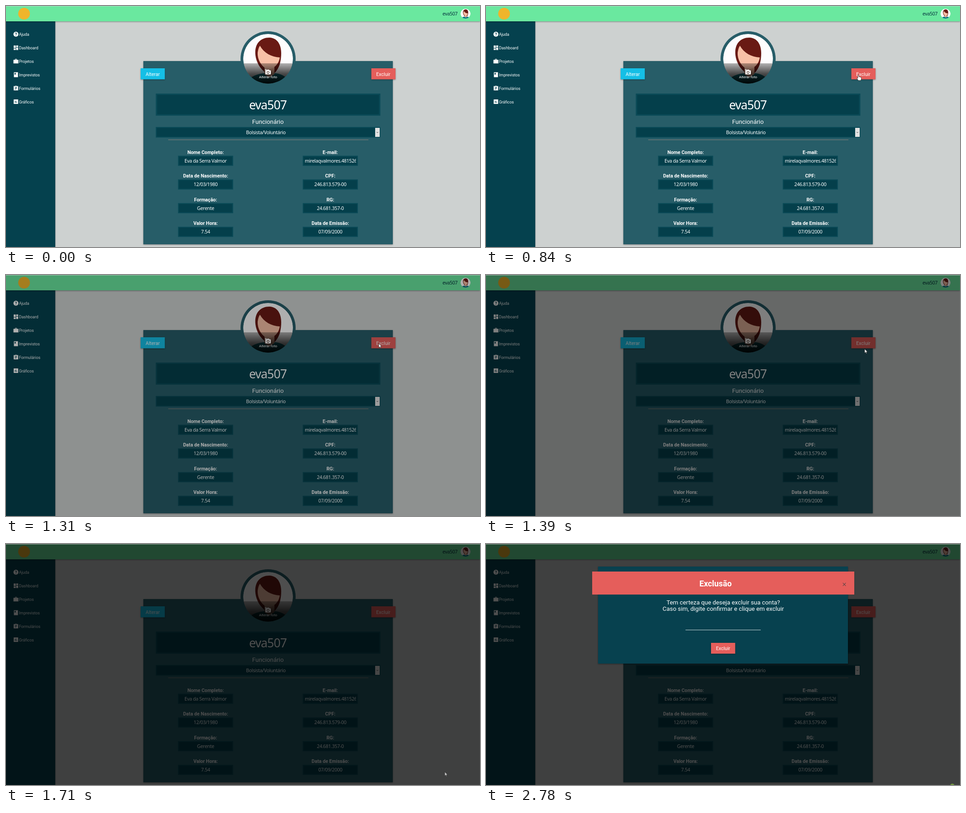
Recreate the animation shown at these times as an HTML page. Size 1049 by 534 pixels, loop 2860 ms.

```html
<!DOCTYPE html>
<html lang="pt-BR">
<head>
<meta charset="utf-8">
<title>Exclusão de conta</title>
<style>
html, body { margin: 0; width: 100%; height: 100%; overflow: hidden; background: #cdd1d0; }
svg.stage { display: block; width: 100vw; height: 100vh; }
text { font: 10.67px Roboto, sans-serif; fill: #fff; }
.mid { text-anchor: middle; }
.bold { font-weight: 700; }
.input { font-family: "Noto Sans", sans-serif; letter-spacing: -.035em; }
.user { font-size: 26.67px; }
.role { font-size: 13.33px; }
.menu { font-size: 8.89px; }
.small { font-size: 8px; }
.title { font-size: 17.8px; font-weight: 700; }
.white { fill: #fff; fill-rule: evenodd; }
.lift { filter: drop-shadow(0 1px 1.5px rgba(0, 0, 0, .4)); }

#dim, #cursor, #arrow, #hand, #modal, #spot { animation: 2860ms step-end infinite; }

#dim { animation-name: dim; }
@keyframes dim {
  0% { opacity: 0; }
  43% { opacity: .12; }
  45.8% { opacity: .31; }
  48.6% { opacity: .5; }
  51.74%, 100% { opacity: .69; }
}
#cursor { animation-name: travel; }
@keyframes travel {
  0% { transform: translate(1100px, 600px); }
  5.24% { transform: translate(1016px, 516px); }
  8.04% { transform: translate(988px, 462px); }
  10.83% { transform: translate(948px, 388px); }
  13.28% { transform: translate(910px, 312px); }
  16.08% { transform: translate(874px, 246px); }
  18.88% { transform: translate(849px, 200px); }
  21.32% { transform: translate(835px, 172px); }
  24.12% { transform: translate(827px, 157px); }
  26.92% { transform: translate(824px, 152px); }
  40.55% { transform: translate(825px, 152px); }
  48.6% { transform: translate(838px, 164px); }
  51.74% { transform: translate(870px, 194px); }
  53.84% { transform: translate(903px, 262px); }
  56.99% { transform: translate(944px, 385px); }
  59.79% { transform: translate(971px, 505px); }
  62.23%, 100% { transform: translate(1100px, 600px); }
}
#arrow { animation-name: arrow; }
@keyframes arrow {
  0% { opacity: 1; }
  24.12% { opacity: 0; }
  40.55% { opacity: 1; }
  51.74%, 100% { opacity: .7; }
}
#hand { animation-name: hand; }
@keyframes hand {
  0% { opacity: 0; }
  24.12% { opacity: 1; }
  40.55%, 100% { opacity: 0; }
}
#modal { animation-name: modal; transform-origin: 524.5px 157.5px; }
@keyframes modal {
  0% { opacity: 0; }
  62.23% { opacity: .4; transform: translateY(-18px) scale(.88); }
  65.03% { opacity: .85; transform: translateY(-4px) scale(.97); }
  67.83%, 100% { opacity: 1; transform: none; }
}
#spot { animation-name: spot; }
@keyframes spot {
  0% { opacity: 0; }
  97.2%, 100% { opacity: 1; }
}
</style>
</head>
<body>
<svg class="stage" viewBox="0 0 1049 534" preserveAspectRatio="none">
  <defs>
    <linearGradient id="shade" x2="0" y2="1">
      <stop stop-opacity=".3"/>
      <stop offset=".5" stop-opacity=".7"/>
      <stop offset="1" stop-opacity=".95"/>
    </linearGradient>
    <clipPath id="round"><circle r="55"/></clipPath>
    <g id="avatar" clip-path="url(#round)">
      <circle r="55" fill="#fdfdfd"/>
      <path d="M-46 55Q-42 36-10 32H16Q40 34 48 55Z" fill="#117a86"/>
      <path d="M-28-8C-31-34-16-47 3-47C21-46 30-31 29-8C28 8 25 20 15 31L-3 33C-18 22-26 8-28-8Z" fill="#691a14"/>
      <path d="M-8 18H14V34L3 42L-8 34Z" fill="#e9ac91"/>
      <path d="M-18-29C-9-13 7-4 26-3C24 11 14 21 2 24C-14 20-24 2-23-14C-22-20-21-25-18-29Z" fill="#f8c1a7"/>
    </g>
  </defs>

  <rect width="1049" height="534" fill="#cdd1d0"/>
  <rect class="lift" y="33" width="109" height="501" fill="#05414e"/>
  <rect class="lift" x="304" y="122" width="552" height="406" fill="#275d68"/>
  <circle cx="580" cy="117" r="61" fill="#275d68"/>

  <rect class="lift" width="1049" height="34" fill="#6ae89f"/>
  <circle cx="40" cy="17" r="13" fill="#efb52b"/>
  <text class="input" x="966" y="21.3" style="fill:#04313d">eva507</text>
  <use href="#avatar" transform="translate(1017 17) scale(.2)"/>
  <g id="menu"></g>

  <use href="#avatar" transform="translate(580 117)"/>
  <g transform="translate(580 117)" clip-path="url(#round)">
    <rect x="-55" y="10" width="110" height="45" fill="url(#shade)"/>
  </g>
  <path class="white" d="M575 142.5h2l1-1.5h4l1 1.5h2q1 0 1 1v7q0 1-1 1h-10q-1 0-1-1v-7q0-1 1-1ZM580 144a3 3 0 1 0 .01 0ZM580 145.2a1.8 1.8 0 1 1-.01 0Z"/>
  <path d="M573 141.5h4M575 139.5v4" stroke="#fff"/>
  <text class="mid small" x="580" y="159.7">Alterar foto</text>

  <rect class="lift" x="298" y="138" width="53.5" height="24.5" fill="#15bfe6"/>
  <text class="mid" x="324.7" y="154.8">Alterar</text>
  <rect class="lift" x="808.5" y="138" width="53.5" height="24.5" fill="#e55e5b"/>
  <text class="mid" x="835" y="154.8">Excluir</text>

  <g id="boxes"></g>
  <text class="mid input user" x="579.5" y="229">eva507</text>
  <text class="mid role" x="579.7" y="260.7">Funcionário</text>
  <text class="mid input" x="575" y="284">Bolsista/Voluntário</text>
  <rect x="817" y="270" width="10" height="20" fill="#e2e2e2"/>
  <path d="M820 279l2 2 2-2" fill="none" stroke="#444" stroke-width=".9"/>
  <path d="M359 296.5H802" stroke="#87807b"/>
  <g id="fields"></g>

  <rect id="dim" width="1049" height="534"/>
  <path d="M0 .5H1049" stroke="#d3dad7" stroke-opacity=".6"/>

  <g id="modal">
    <rect class="lift" x="248" y="50" width="553" height="215" fill="#07414f"/>
    <rect x="235" y="61" width="580" height="51" fill="#e55e5b"/>
    <text class="mid title" x="508" y="94">Exclusão</text>
    <path d="M789.7 86.2l6.6 6.6m0-6.6l-6.6 6.6" stroke="#5b4548" stroke-width="1.1"/>
    <text class="mid role" x="525" y="134.2">Tem certeza que deseja excluir sua conta?</text>
    <text class="mid role" x="525" y="147.5">Caso sim, digite confirmar e clique em excluir</text>
    <path d="M441.5 190.5H608" stroke="#e9efef" stroke-opacity=".85"/>
    <rect class="lift" x="498" y="219" width="53.5" height="24" fill="#e55e5b"/>
    <text class="mid" x="524.7" y="235.3">Excluir</text>
  </g>

  <g id="cursor" stroke="#222" stroke-width=".7" fill="#fff">
    <path id="arrow" d="M0 0V8.800L2.100 7L3.400 10L4.800 9.400L3.500 6.400H6.400Z"/>
    <path id="hand" d="M-1 1Q0-.5 1 1V5Q2.4 4 3 5.4Q4.5 4.6 5 6Q6.6 5.4 6.6 7V9Q6.6 11 5.4 13H0Q-1.6 10.5-3.6 8Q-3.4 6.3-1 8.2Z"/>
  </g>
  <circle id="spot" cx="1032" cy="536" r="5" fill="#71963f"/>
</svg>

<script>
const fill = (id, parts) => document.getElementById(id).innerHTML = parts.join('');

const box = (x, y, w, h, edge) =>
  `<rect x="${x}" y="${y}" width="${w}" height="${h}" fill="#0a4a57"/>
   <rect x="${x + edge}" y="${y + edge}" width="${w - 2 * edge}" height="${h - 2 * edge}" fill="#043f4b"/>`;

const columns = [
  [441.7, ['Nome Completo:', 'Eva da Serra Valmor'], ['Data de Nascimento:', '12/03/1980'],
    ['Formação:', 'Gerente'], ['Valor Hora:', '7.54']],
  [717.7, ['E-mail:', 'mirelaqvalmores.481526@'], ['CPF:', '246.813.579-00'],
    ['RG:', '24.681.357-0'], ['Data de Emissão:', '07/09/2000']]
];
const boxes = [box(331.5, 194, 497, 49, 3), box(331.5, 268, 497, 23.5, 2)];
const fields = [];
for (const [x, ...rows] of columns) {
  rows.forEach(([label, value], row) => {
    const y = 331.7 + row * 52.5;
    const long = value.length > 20;
    boxes.push(box(x - 61, y, 122, 22.5, 2));
    fields.push(
      `<text class="mid bold" x="${x}" y="${y - 4}">${label}</text>
       <svg x="${x - 57}" y="${y}" width="114" height="22" overflow="hidden">
         <text class="input ${long ? '' : 'mid'}" x="${long ? .5 : 57}" y="15.3">${value}</text>
       </svg>`);
  });
}
fill('boxes', boxes);
fill('fields', fields);

// Icons are drawn on a 24 unit grid
const menu = [
  ['Ajuda', 'M12 1a11 11 0 1 0 .01 0ZM11 17h2.4v2.4h-2.4ZM8 9q0-4 4-4t4 4q0 2-1.8 3.4-1 .8-1 2.6h-2.4q0-2.7 1.6-4 1.2-1 1.2-2 0-1.7-1.6-1.7T10.4 9Z'],
  ['Dashboard', 'M2 2h9v11H2ZM2 15h9v7H2ZM13 11h9v11h-9ZM13 2h9v7h-9Z'],
  ['Projetos', 'M8 6V2h8v4h7v16H1V6ZM10 6h4V4h-4Z'],
  ['Imprevistos', 'M3 1h18v22H3ZM6 4v8l2.5-1.5L11 12V4Z'],
  ['Formulários', 'M2 3h7q1-2 3-2t3 2h7v19H2ZM7 7v2h10V7ZM7 11v2h10v-2ZM7 15v2h7v-2Z'],
  ['Gráficos', 'M2 2h20v20H2ZM7 10v7h2v-7ZM11 7v10h2V7ZM15 13v4h2v-4Z']
];
fill('menu', menu.map(([label, icon], i) => {
  const y = 62.5 + i * 29.9;
  return `<path class="white" transform="translate(16 ${y - 6}) scale(.5)" d="${icon}"/>
    <text class="menu" x="28.7" y="${y + 3.6}">${label}</text>`;
}));
</script>
</body>
</html>
```
